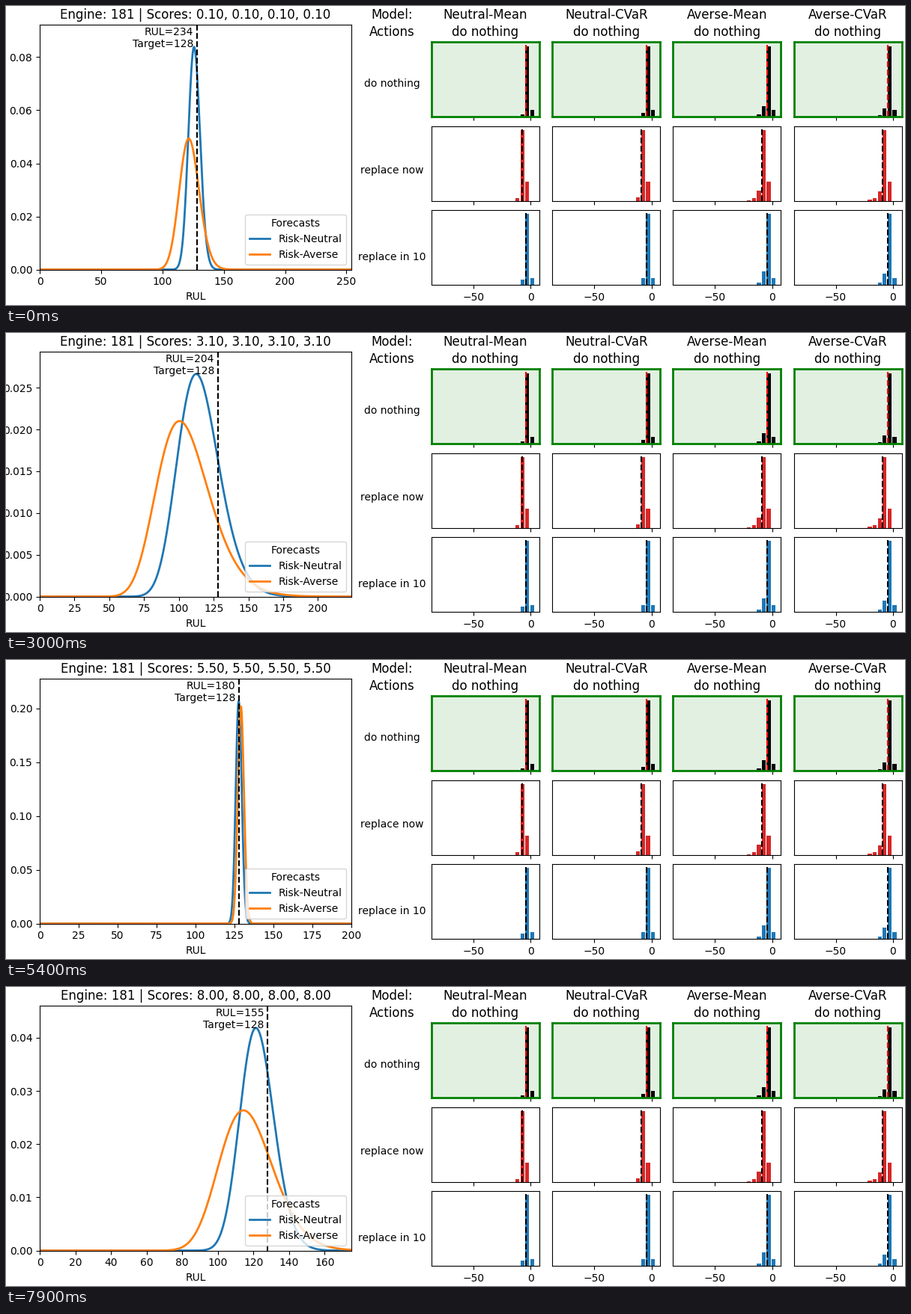
A matplotlib script that plays this animation: 1200x400 px, repeating every 8000 ms.

```python
import numpy as np
import matplotlib.pyplot as plt
from matplotlib.animation import FuncAnimation

W, H, DPI = 1200, 400, 100
FRAMES, STEP_MS = 80, 100
START_RUL, TARGET = 234, 128
MODELS = ["Neutral-Mean", "Neutral-CVaR", "Averse-Mean", "Averse-CVaR"]

# Forecast key steps: log-normal modes and widths, interpolated in between
KEYS = [0, 10, 21, 39, 54, 68, 79]
NEUTRAL = ([125.8, 127.9, 104.5, 120.4, 127.7, 125.0, 121.4],
           [.0378, .0163, .207, .0842, .0151, .05, .0783])
AVERSE = ([121.5, 123.5, 91.3, 109.6, 129.1, 118.7, 114.4],
          [.0664, .0581, .2566, .1346, .0153, .1153, .1312])

# Per action: name, label height, colour, line colour, last filled bin, line
# positions, and bar heights (percent of the panel) from right to left per model
BIN, LAST_BIN, TALL = 4.3, 1.25, 94.5
ACTIONS = [
    ("do nothing", 104, "black", "red", 0, [-3.9, -4.3, -4.6, -4.8],
     [[9.5, TALL, 3.5], [9.5, TALL, 5.5], [9.5, TALL, 14, 3.5], [9.5, TALL, 11.5, 2]]),
    ("replace now", 220, "tab:red", "black", 1, [-7.7, -9.1, -8.8, -9.4],
     [[26, TALL, 4], [25.5, TALL, 5], [25.5, TALL, 14, 4, 1], [25.5, TALL, 12.5, 3.5, 1.3]]),
    ("replace in 10", 336, "tab:blue", "black", 0, [-4.2, -4.5, -4.6, -4.8],
     [[8.5, TALL, 7], [8.5, TALL, 8.5], [8.5, TALL, 18, 3], [8.5, TALL, 15, 3]]),
]

# Grid of outcome panels, in pixels
LEFT, TOP, PITCH_X, PITCH_Y, PANEL_W, PANEL_H = 568, 48.3, 161.2, 112.3, 144, 100

fig = plt.figure(figsize=(W / DPI, H / DPI), dpi=DPI, facecolor="white")


def panel(x, y, w, h):
    """Add axes at a pixel box measured from the top left."""
    return fig.add_axes([x / W, 1 - (y + h) / H, w / W, h / H])


def label(x, y, text, size=12, va="baseline"):
    fig.text(x / W, 1 - y / H, text, fontsize=size, ha="center", va=va)


def draw_outcomes(row, col):
    _, _, color, line_color, first, means, bars = ACTIONS[row]
    ax = panel(LEFT + PITCH_X * col, TOP + PITCH_Y * row, PANEL_W, PANEL_H)
    heights = bars[col]
    centers = LAST_BIN - BIN * (first + np.arange(len(heights)))
    ax.bar(centers, heights, width=0.8 * BIN, color=color)
    ax.plot([means[col]] * 2, [0, 96.5], "--", color=line_color, lw=1.5)
    ax.set(xlim=(-86.6, 7.6), ylim=(0, 100), xticks=[-50, 0], yticks=[])
    ax.tick_params(labelbottom=row == 2)
    if row == 0:
        ax.set_facecolor("#e1f0e1")
        for spine in ax.spines.values():
            spine.set(color="green", linewidth=2)


label(515, 16.7, "Model:")
label(515, 39.7, "Actions")
for row, action in enumerate(ACTIONS):
    label(515, action[1], action[0], 10, "center")
    for col in range(len(MODELS)):
        draw_outcomes(row, col)
for col, model in enumerate(MODELS):
    x = LEFT + PANEL_W / 2 + PITCH_X * col
    label(x, 16.7, model)
    label(x, 39.7, "do nothing")

main = panel(45, 25, 416, 327.6)
main.set_xlabel("RUL")
title = main.set_title("")
neutral, = main.plot([], [], lw=2, color="tab:blue", label="Risk-Neutral")
averse, = main.plot([], [], lw=2, color="tab:orange", label="Risk-Averse")
main.axvline(TARGET, color="black", ls="--", lw=1.5)
note = main.annotate("", (TARGET, 0.99), xycoords=("data", "axes fraction"),
                     xytext=(-3.3, 0), textcoords="offset points",
                     ha="right", va="top")
main.legend(title="Forecasts", loc="lower right")


def forecast(step, keys, x):
    """Log-normal density with interpolated mode and width."""
    mode = np.interp(step, KEYS, keys[0])
    sigma = np.exp(np.interp(step, KEYS, np.log(keys[1])))
    peak = np.exp(-sigma**2 / 2) / (mode * sigma * np.sqrt(2 * np.pi))
    return peak * np.exp(-0.5 * (np.log(x / mode) / sigma) ** 2), peak


def update(step):
    rul = START_RUL - step
    x = np.linspace(0.01, rul + 20, 900)
    peaks = []
    for line, keys in ((neutral, NEUTRAL), (averse, AVERSE)):
        density, peak = forecast(step, keys, x)
        line.set_data(x, density)
        peaks.append(peak)
    main.set_xlim(0, rul + 20)
    main.set_ylim(0, 1.1 * max(peaks))
    scores = ", ".join([f"{(step + 1) / 10:.2f}"] * len(MODELS))
    title.set_text(f"Engine: 181 | Scores: {scores}")
    note.set_text(f"RUL={rul}\nTarget={TARGET}")
    return neutral, averse, title, note


anim = FuncAnimation(fig, update, frames=FRAMES, interval=STEP_MS,
                     repeat=True, repeat_delay=0, blit=False)
plt.show()
```
